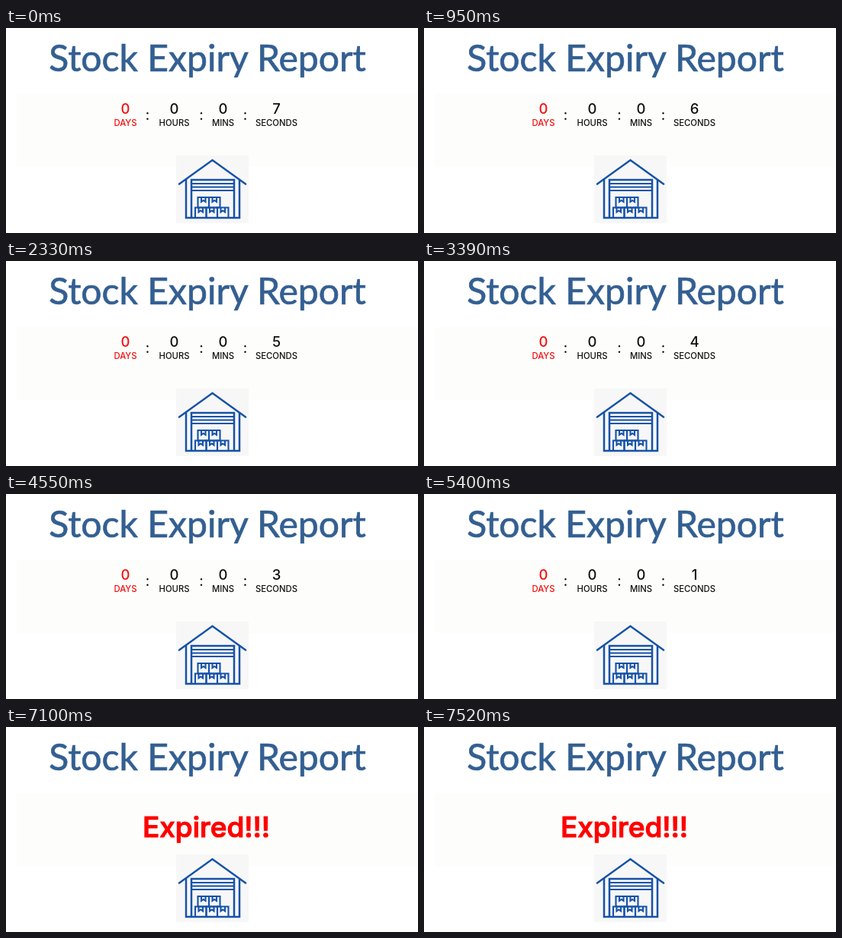
An HTML page for the animation above (8250 ms loop, 540x270 px).

```html
<!DOCTYPE html>
<html lang="en">
<head>
<meta charset="utf-8">
<title>Stock Expiry Report</title>
<style>
  html, body { margin: 0; width: 100%; height: 100%; overflow: hidden; background: #fff; }
  svg { display: block; width: 100vw; height: 100vh; }
  text { font-family: Inter, sans-serif; text-anchor: middle; }
  .title { font-family: Lato, sans-serif; font-size: 48.1px; fill: #335f92; stroke: #335f92; stroke-width: .7; }
  .num { font-size: 18.5px; font-weight: 500; }
  .label { font-size: 11.3px; font-weight: 500; }
  .colon { font-size: 19px; font-weight: 400; }
  .over { font-size: 37px; font-weight: 500; fill: #f00; stroke: #f00; stroke-width: 1.2; stroke-linejoin: round; }
  .line { fill: none; stroke: #1552a8; stroke-width: 2.5; }
  .thin { stroke-width: 2.1; }
</style>
</head>
<body>
<svg viewBox="0 0 540 270">
  <rect width="540" height="270" fill="#fff"/>
  <text class="title" x="264" y="57">Stock Expiry Report</text>
  <rect x="14" y="87" width="526" height="96" fill="#fdfdfb"/>
  <g id="clock"></g>
  <text id="over" class="over" x="262.5" y="145">Expired!!!</text>
  <rect x="223" y="168" width="95" height="89" fill="#f7f7f7"/>
  <g class="line">
    <path d="M227 205.5L270.5 174L314 205.5" stroke-linecap="round"/>
    <path d="M236 199V250H306V199M243 250V200H299V250"/>
    <path class="thin" d="M243 205H299M243 209.5H299M243 214H299"/>
    <g id="boxes" class="thin"></g>
  </g>
</svg>
<script>
  const LOOP = 8250;
  const EXPIRED = 6040;
  const TICKS = [[0, 7], [950, 6], [2010, 5], [2970, 4], [4020, 3], [4980, 1]];
  const UNITS = [[156.5, "DAYS", "#f01010"], [220.5, "HOURS", "#111"], [284.5, "MINS", "#111"], [354.5, "SECONDS", "#111"]];
  const get = id => document.getElementById(id);
  const clock = get("clock"), over = get("over");

  const unit = ([x, name, color]) =>
    `<g fill="${color}"><text class="num" x="${x}" y="113">0</text><text class="label" x="${x}" y="128.5">${name}</text></g>`;
  const colon = x => `<text class="colon" x="${x}" y="121">:</text>`;
  clock.innerHTML = UNITS.map(unit).join("") + [185.5, 256, 313.5].map(colon).join("");
  const seconds = clock.querySelectorAll("g .num")[3];

  const box = (x, y) =>
    `<path d="M${x} ${y}h14.5v13.5h-14.5zM${x + 4.5} ${y}v6l2.75 -2l2.75 2v-6"/>`;
  get("boxes").innerHTML = [[251.5, 223], [266, 223], [248, 236.5], [262.5, 236.5], [277, 236.5]]
    .map(([x, y]) => box(x, y)).join("");

  function draw(t) {
    const done = t >= EXPIRED;
    clock.style.display = done ? "none" : "";
    over.style.display = done ? "" : "none";
    seconds.textContent = TICKS.filter(([at]) => at <= t).pop()[1];
  }

  const start = performance.now();
  function frame() {
    draw((performance.now() - start) % LOOP);
    requestAnimationFrame(frame);
  }
  draw(0);
  requestAnimationFrame(frame);
</script>
</body>
</html>
```
